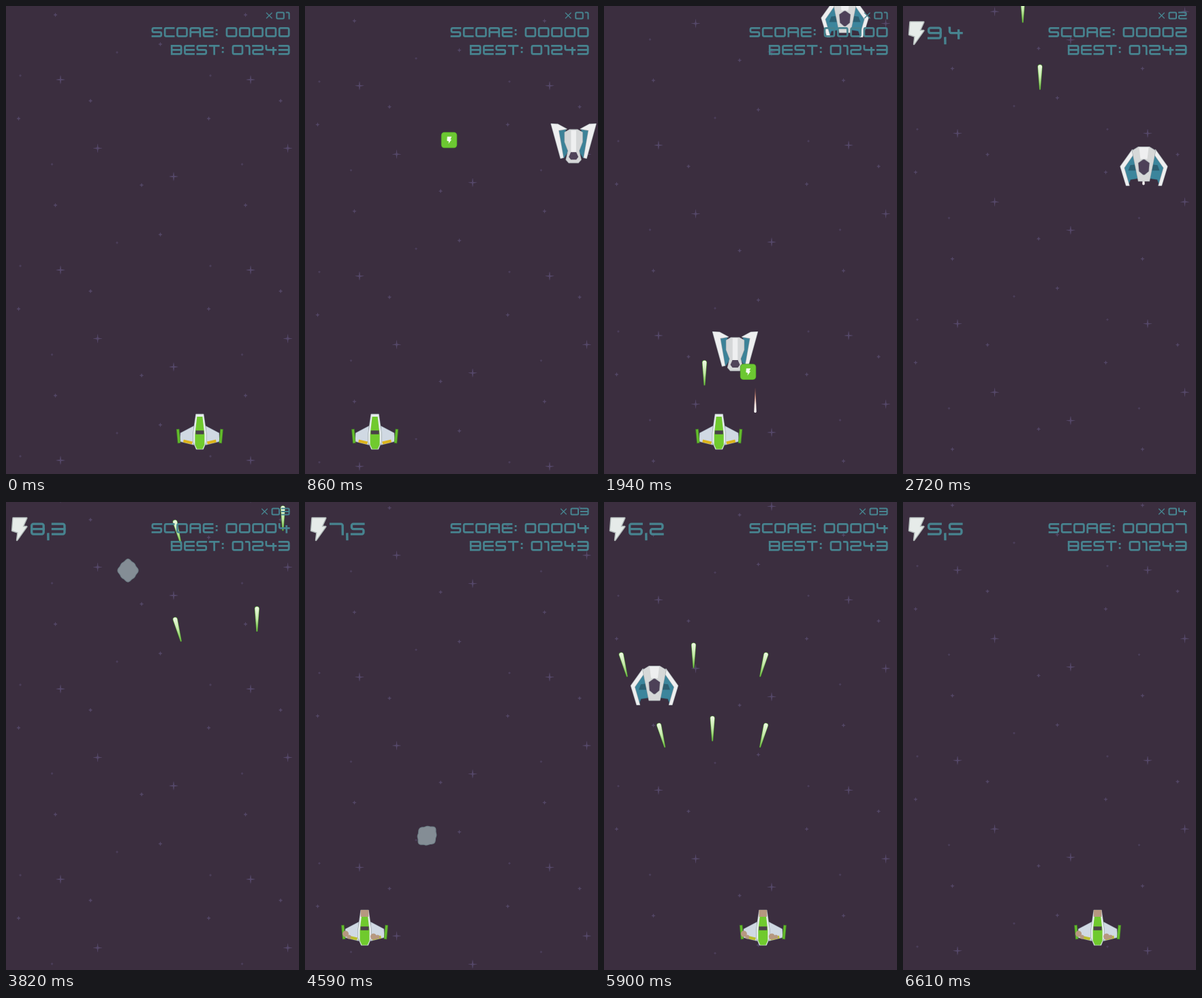
These frames come from a looping animation (430 by 686 pixels, 6680 ms). An HTML page with a canvas:

```html
<!DOCTYPE html>
<html lang="en">
<head>
<meta charset="utf-8">
<title>Space shooter</title>
<style>
html, body { margin: 0; width: 100%; height: 100%; overflow: hidden; background: #3b2e3f; }
canvas { display: block; width: 430px; height: 686px; }
</style>
</head>
<body>
<canvas id="stage" width="430" height="686" role="img"></canvas>
<script>
const canvas = document.getElementById('stage');
const ctx = canvas.getContext('2d');
const LOOP = 6680, FRAMES = 86, STEP = 77.75;
const TEAL = '#47838f', WHITE = '#eeeff0', EDGE = '#a0a8ac';

// ---- motion (times in ms, speeds in px per ms) ----
const SHIP_SPEED = 0.2125, SHOT_SPEED = 0.825, FALL = 0.28, SCROLL = 0.3365;
const WALL = 20, SPAN = 389, TURN = 6382;
const HIT = 2018, PICKUP = 2150, SAFE = 4020;
const SHOTS = [1844, 1977, 2096, 2840, 3087, 3266, 5430, 5560];

// The ship runs from wall to wall at a steady speed and turns back early once.
function shipX(t) {
  const s = SHIP_SPEED * (Math.min(t, 2 * TURN - t) - 1244);
  const fold = Math.abs(s) % (2 * SPAN);
  return WALL + Math.min(fold, 2 * SPAN - fold);
}

// Each enemy falls from above the stage and dies by one shot.
const ENEMIES = [
  { draw: raider, born: 240, x: t => 215 + 181 * Math.cos((t - 940) / 592), shot: 1844, side: 0, dies: 2018 },
  { draw: drone, born: 1985, x: () => 353.5, shot: 2840, side: 0, dies: 3116 },
  { draw: drone, born: 5051, x: () => 74, shot: 5560, side: -1, dies: 5955 }
];

// ---- drawing helpers ----
function at(x, y, draw, angle = 0, size = 1) {
  ctx.save();
  ctx.translate(x, y);
  ctx.rotate(angle);
  ctx.scale(size, size);
  draw();
  ctx.restore();
}
function poly(fill, p, edge, width = 1.3) {
  ctx.beginPath();
  for (let i = 0; i < p.length; i += 2) ctx.lineTo(p[i], p[i + 1]);
  ctx.closePath();
  finish(fill, edge, width);
}
function finish(fill, edge, width) {
  ctx.lineJoin = 'round';
  if (edge) { ctx.strokeStyle = edge; ctx.lineWidth = width; ctx.stroke(); }
  ctx.fillStyle = fill;
  ctx.fill();
}
function both(draw) {
  draw();
  ctx.save();
  ctx.scale(-1, 1);
  draw();
  ctx.restore();
}
const pair = (...args) => both(() => poly(...args));
function sym(fill, half, edge) {
  const all = half.slice();
  for (let i = half.length - 2; i >= 0; i -= 2) all.push(-half[i], half[i + 1]);
  poly(fill, all, edge);
}
function bar(color, width, x1, y1, x2, y2) {
  ctx.beginPath();
  ctx.moveTo(x1, y1);
  ctx.lineTo(x2, y2);
  ctx.strokeStyle = color;
  ctx.lineWidth = width;
  ctx.stroke();
}
function blot(x, y, r) {
  ctx.beginPath();
  ctx.arc(x, y, r, 0, 7);
  finish('#b69880');
}
// A slim drop: round head at -18, point at 18.
function drop(r, colors, edge) {
  const g = ctx.createLinearGradient(0, -18, 0, 18);
  colors.forEach((c, i) => g.addColorStop(i / (colors.length - 1), c));
  ctx.beginPath();
  ctx.arc(0, r - 18, r, Math.PI, 0);
  ctx.lineTo(0.4, 18);
  ctx.lineTo(-0.4, 18);
  ctx.closePath();
  finish(g, edge, 1.2);
}

// ---- background: one star tile, repeated ----
const TILE = 279;
const SKY = [
  { r: 7, alpha: 0.85, stars: [[80, 108], [134.5, 208.5], [246, 250]] },
  { r: 3.2, alpha: 0.65, stars: [[72.5, 13], [124, 139], [18.5, 165], [199, 262.5], [226.5, 56]] },
  { r: 2, alpha: 0.4, stars: [[67.5, 232], [163, 68], [21, 102]] }
];
function sky(t) {
  ctx.fillStyle = '#3b2e3f';
  ctx.fillRect(0, 0, 430, 686);
  const shift = t * SCROLL % TILE, n = 0.9;
  for (const { r, alpha, stars } of SKY) {
    ctx.globalAlpha = alpha;
    for (const [x, y] of stars)
      for (let i = 0; i < 2; i++)
        for (let j = -1; j < 3; j++)
          at(x + i * TILE, y + shift + j * TILE, () => both(() => sym('#56496a', [0, -r, -n, -n, -r, 0, -n, n, 0, r])));
  }
  ctx.globalAlpha = 1;
}

// ---- objects ----
function ship(hurt) {
  pair('#d0d9e3', [-9, 18, -28, 28, -29, 40, -9, 45], '#8e99a6');
  both(() => bar(hurt ? '#b9bf2c' : '#dcb41c', 4, -24, 39.5, -11, 42.5));
  both(() => bar('#4a8a2a', 4.4, -32.3, 22, -30.3, 43));
  both(() => bar('#64bd2b', 2.8, -32.1, 23, -30.3, 42));
  sym('#e6ecec', [-5.5, 0.5, -9.5, 28, -9.5, 41, -5, 51.5], '#98a3a8');
  sym('#70ca2e', [-4, 4, -7, 30, -7, 45, -4, 51.5]);
  bar('#4a4149', 5.5, -6, 27, 6, 27);
  if (hurt) {
    bar('#b69880', 10, -5.8, 5, 5.8, 5);
    blot(-28, 35, 4.5);
    blot(-23, 39.5, 3);
    blot(13, 39, 4.5);
    blot(19, 39.5, 3);
  }
}
function raider() {
  pair('#3d8298', [-23, 11, -12, 8, -9, 42, -14, 50, -19, 50], '#326a7d');
  pair(WHITE, [-33, 0.5, -23, 1, -10, 8, -22, 10, -15, 50, -19, 51], EDGE);
  sym('#d5d7d8', [-6, 9, -13, 13, -13, 27, -8, 40, -11, 53, -7, 57.5], EDGE);
  bar(WHITE, 7.5, 0, 10, 0, 42);
  sym('#50445a', [-4, 42, -7, 49, -4, 53]);
}
function drone() {
  pair('#3c859c', [-14, 9, -30, 30, -23, 56, -20, 48, -7, 46], '#316b7e');
  pair('#2c6073', [-20, 27, -12, 26, -10, 35, -23, 35]);
  pair(WHITE, [-17, 4.5, -34.5, 29, -26, 57, -21.5, 57, -29, 31, -13, 8], EDGE);
  sym('#d6d8d8', [-8, 0.5, -17, 6, -8, 50.5], EDGE);
  sym(WHITE, [-7, 1, -5, 18]);
  sym('#4d4158', [-1, 19, -8, 24, -7, 36, -1, 41], EDGE);
}
const laser = () => drop(3, ['#eef9e3', '#c4e8a8', '#6fbf3c'], '#55a036');
const dart = () => drop(1.7, ['#fff', '#f5e5df', '#bd8577', 'rgba(150,80,70,.3)']);
const BOLT = [-6, -11, 8, -11, 4, -2, 8, -2, -2, 12, -1, 4, -7, 2];

function powerUp() {
  ctx.beginPath();
  ctx.roundRect(-11, -11, 22, 22, 4);
  finish('#6cc832', '#4f9a2b', 1.5);
  at(0, 0, () => poly('#f4fbef', BOLT), 0, 0.46);
}
function meteor() {
  ctx.beginPath();
  for (let a = 0; a < 6.28; a += 0.1) {
    const r = 14.6 + 1.1 * Math.cos(4 * a) + 0.6 * Math.cos(8 * a);
    ctx.lineTo(r * 0.9 * Math.cos(a), r * Math.sin(a));
  }
  ctx.closePath();
  finish('#848d95', '#6c7d85', 2);
}

// ---- lettering: strokes through the nodes a-i of a 3x3 grid, j-m on a side column ----
const GLYPHS = {
  0: 'bcigab', 1: 'aci', 2: 'acfdgi', 3: 'acig df', 4: 'adf jl', 5: 'cadfig',
  6: 'cagifd', 7: 'aci', 8: 'bcigab df', 9: 'gicadf',
  S: 'cadfig', C: 'cagi', O: 'bcigab', R: 'gacfd fi', E: 'cagi df', B: 'acig ag df', T: 'ac bh',
  ':': 'j k', ',': 'lm', ' ': ''
};
const NARROW = { 1: 5, ':': 1, ',': 0, ' ': 4 };
const glyphWidth = c => NARROW[c] ?? ('SCET'.includes(c) ? 13 : 14);
const advance = c => glyphWidth(c) + 5.3;

function node(letter, width) {
  const k = letter.charCodeAt(0) - 97;
  if (k < 9) return [k % 3 / 2 * width, Math.floor(k / 3) * 6];
  return [0.75 * width, 3 + 'jklm'.indexOf(letter) * 6 - (k > 10 ? 3 : 0)];
}
function glyph(c) {
  ctx.beginPath();
  for (const line of GLYPHS[c].split(' ')) {
    const p = [...line].map(l => node(l, glyphWidth(c)));
    if (!p.length) continue;
    ctx.moveTo(...p[0]);
    for (let i = 1; i < p.length - 1; i++) ctx.arcTo(...p[i], ...p[i + 1], 2);
    const [x, y] = p[p.length - 1];
    ctx.lineTo(x + 0.1, y);
  }
  ctx.stroke();
}
function write(text, x, y, size, right) {
  const width = [...text].reduce((sum, c) => sum + advance(c), -2.6) * size;
  const left = right ? x - width : x;
  at(left, y, () => {
    ctx.translate(1.35, 1.35);
    ctx.strokeStyle = TEAL;
    ctx.lineWidth = 2.7;
    ctx.lineCap = 'square';
    ctx.lineJoin = 'round';
    for (const c of text) {
      glyph(c);
      ctx.translate(advance(c), 0);
    }
  }, 0, size);
  return left;
}

function hud(t) {
  const kills = ENEMIES.filter(e => t >= e.dies).length;
  const points = kills * (kills + 1) / 2 + (t >= PICKUP ? 1 : 0);
  const score = 'SCORE: ' + String(points).padStart(5, '0');
  const best = 'BEST: 01243';
  const chain = '0' + (kills + 1);
  const x = write(chain, 416.5, 8.5, 0.75, true) - 10;
  both(() => {});
  bar(TEAL, 1.3, x - 4.3, 9.7, x + 4.3, 18.3);
  bar(TEAL, 1.3, x + 4.3, 9.7, x - 4.3, 18.3);
  write(score, 416.5, 31, 1, true);
  write(best, 416.5, 57, 1, true);
  let label = `×${chain} ${score} ${best}`;
  if (t >= PICKUP) {
    const left = (10 - (t - 2120) / 1000).toFixed(1).replace('.', ',');
    at(19, 39, () => poly('#e6ebe9', BOLT, '#b0b9b8', 2), 0, 1.4);
    write(left, 36, 30.4, 1.25);
    label += ' ' + left;
  }
  if (canvas.getAttribute('aria-label') !== label) canvas.setAttribute('aria-label', label);
}

function shots(t) {
  for (const t0 of SHOTS) {
    const d = (t - t0) * SHOT_SPEED;
    if (d < 0 || d > 690) continue;
    for (const side of t0 > PICKUP ? [-1, 0, 1] : [0]) {
      if (ENEMIES.some(e => e.shot === t0 && e.side === side && t >= e.dies)) continue;
      const a = side * Math.PI / 12;
      at(shipX(t0) + d * Math.sin(a), 620 - d * Math.cos(a), laser, a);
    }
  }
}

function scene(t) {
  sky(t);
  shots(t);
  if (t > 1815 && t < HIT) at(222, 472 + (t - 1815) * SHOT_SPEED, dart, Math.PI);
  if (t > 2700 && t < 3260) at(353, 227 + (t - 2700) * SHOT_SPEED, dart, Math.PI);
  if (t > 3500 && t < 5100) at(179, 100.5 + (t - 3810) / 2, meteor, (t - 3810) / 1000);
  for (const e of ENEMIES)
    if (t < e.dies) at(e.x(t), (t - e.born) * FALL, e.draw);
  if (t < PICKUP) at(211.5, 196.5 + (t - 855) * 0.312, powerUp);
  const hidden = t > HIT && t < SAFE && Math.round(t / STEP) % 2;
  if (!hidden) at(shipX(t), 598, () => ship(t > HIT));
  hud(t);
}

const start = performance.now();
function tick() {
  const t = (performance.now() - start) % LOOP;
  scene(Math.min(FRAMES - 1, Math.floor((t + 10) / STEP)) * STEP);
  requestAnimationFrame(tick);
}
tick();
</script>
</body>
</html>
```
